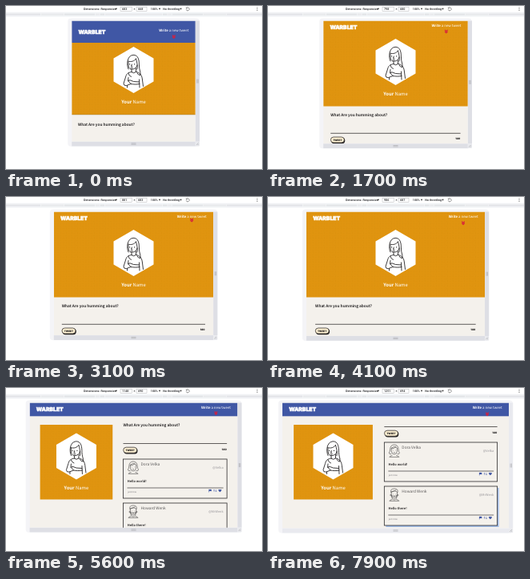
These frames come from a looping animation (320x204 px, 8000 ms). An HTML page:

```html
<!DOCTYPE html>
<html lang="en">
<head>
<meta charset="utf-8">
<title>Responsive page</title>
<style>
  html, body { margin: 0; width: 100%; height: 100%; overflow: hidden; background: #fff; }
  svg { display: block; width: 100vw; height: 100vh; }
  text { white-space: pre; text-rendering: geometricPrecision; }
  .body { font-family: "Noto Sans CJK JP", "Noto Sans CJK SC", "Noto Sans CJK", "Open Sans", sans-serif; }
  .logo { font-family: Inter, "DejaVu Sans", sans-serif; font-weight: 900; }
  .tool { font-family: Roboto, "Liberation Sans", sans-serif; }
</style>
</head>
<body>
<svg id="stage" viewBox="0 0 320 204" preserveAspectRatio="none">
  <defs>
    <pattern id="weave" width="7" height="6" patternUnits="userSpaceOnUse">
      <rect width="7" height="6" fill="#e0940f"/>
      <path d="M0 .6h2.4M3.5 3.4h2.4M1.4 2v2.6M5 5v1M5 0v1.6" stroke="#c98208" stroke-width=".4" opacity=".3"/>
    </pattern>
  </defs>
  <g id="scene"></g>
</svg>
<script>
const LOOP = 8000, STEP = 100;
const SCALE = 0.2263, MID = 159.5, TOP = 18.5;
const BLUE = '#4057a5', CREAM = '#f4f1ec', INK = '#1d1b1c';

// [time, device pixels]
const WIDTHS = [[0, 683], [100, 683], [1000, 736], [1700, 798], [2000, 818], [2100, 818],
  [3000, 879], [3100, 881], [3900, 959], [4800, 1080], [5600, 1148], [6600, 1251]];
const HEIGHTS = [[0, 668], [100, 668], [1000, 675], [1900, 681], [3000, 683],
  [3900, 686], [4800, 690], [5700, 690], [6600, 694]];

const clamp = v => Math.max(0, Math.min(1, v));
const ease = v => v * v * (3 - 2 * v);

function sample(table, t) {
  const i = table.findIndex(p => p[0] > t);
  if (i < 0) return table[table.length - 1][1];
  const [t0, v0] = table[i - 1], [t1, v1] = table[i];
  return v0 + (v1 - v0) * (t - t0) / (t1 - t0);
}

const rect = (x, y, w, h, fill, more = '') =>
  `<rect x="${x}" y="${y}" width="${w}" height="${h}" fill="${fill}" ${more}/>`;
const line = (d, stroke = INK, width = .8, more = '') =>
  `<path d="${d}" fill="none" stroke="${stroke}" stroke-width="${width}" ${more}/>`;
const move = (x, y, inner) => `<g transform="translate(${x} ${y})">${inner}</g>`;
const text = (x, y, s, size, fill, { cls = 'body', weight = 400, anchor = 'start', more = '' } = {}) =>
  `<text class="${cls}" x="${x}" y="${y}" font-size="${size}" fill="${fill}" ` +
  `text-anchor="${anchor}" style="font-weight:${weight}" ${more}>${s}</text>`;
const bold = s => `<tspan style="font-weight:700">${s}</tspan>`;

function toolbar(w, h) {
  const tool = (x, s, anchor = 'start') =>
    text(x, 5.1, s, 3.7, '#202124', { cls: 'tool', anchor, weight: 500 });
  const caret = x => `<path d="M${x} 2.8h2.4l-1.2 1.9z" fill="#222"/>`;
  const field = (x, wide, n) =>
    rect(x, 1.3, wide, 5, '#fff', 'stroke="#a4a7ab" stroke-width=".4"') + tool(x + 2, Math.round(n));
  let out = rect(0, 0, 320, 8, '#fff') + rect(0, 8, 320, 5, '#f1f2f4');
  [1440, 1024, 768, 425, 375, 320].forEach((px, i) => {
    const half = px * SCALE / 2;
    out += rect(MID - half, 9.2, half * 2, 2.6, i % 2 ? '#e6e8eb' : '#e0e2e6',
      'stroke="#f6f7f8" stroke-width=".6"');
  });
  out += line('M0 8H320M0 13H320', '#e4e5e8', .3);
  out += tool(97, 'Dimensions: Responsive') + caret(136.6);
  out += field(143, 14.5, w) + tool(160.5, '×', 'middle') + field(163, 13, h);
  out += tool(180.8, '100%') + caret(190.8) + tool(196.3, 'No throttling') + caret(217.3);
  out += line('M225.5 2.7a2 2 0 1 1-.3 1.6M225.2 1.7l.3 1.3 1.3-.2', '#444', .55);
  for (const y of [2, 3.7, 5.4]) out += `<circle cx="314" cy="${y}" r=".5" fill="#444"/>`;
  return out;
}

function portrait() {
  const hex = '<path d="M0-29 25-14.5V14.5L0 29-25 14.5V-14.5z" fill="#fff"/>';
  const hair = 'M-6.5-1C-9-6-8.5-18-.5-18.7 6.5-19 7-11 7-5 7 0 9 2 8.5 6.5Q6 7 4.5 4M-7-11C-3-9.5 1-11 3-14M3-14C4-10 5.5-6 4.5-1';
  const face = 'M-6.5-10C-7-4-5.5-.8-2.5-.8 1.5-.8 4-3 4.5-6M-2.2-7l-.8 2.4h1.2M-3.4-2.7q1.2.5 2.2 0';
  const torso = 'M-2.5-.6V2.6Q0 5 3 2.4V-2M-2.5 2.6C-7 3-9 5-10 9L-12.5 17Q-12.5 20-9 19.6L-3.5 17.5M3 2.4C8 3.5 10 6 10.8 11L12 20.5M-6.5 9.5L-7 14M-8 19.5V22M7 12L7.5 22M7.5 17.5C3 18.5 0 18-3.5 17.5L-6 14.5Q-6.5 12-4 13L0 14.5 7 15M-6.5 4.5Q-5.5 8-3 8.5';
  return hex + line(hair + face + torso, INK, .85, 'stroke-linecap="round" stroke-linejoin="round"') +
    '<circle cx="-4.8" cy="-7.2" r=".6"/><circle cx="1" cy="-7.2" r=".6"/>';
}

function profile(x, y, w, h, hexY) {
  const cx = x + w / 2;
  return rect(x, y, w, h, 'url(#weave)') + move(cx, hexY, portrait()) +
    text(cx, hexY + 41.7, bold('Your') + ' Name', 5.9, '#fff', { anchor: 'middle', weight: 300 });
}

function header(w, t, tall, fill) {
  const mid = TOP + (tall ? 12.2 : 6.4);
  const navX = w - 8.5;
  const bounce = mid + 5.7 + 1.9 * Math.cos(2 * Math.PI * t / 2000);
  return (fill ? rect(0, TOP, w, tall ? 27.5 : 16.8, fill) : '') +
    text(8.2, mid + 4.3, 'WARBLET', 6.8, '#fff',
      { cls: 'logo', weight: 900, more: 'stroke="#fff" stroke-width=".5"' }) +
    text(navX, mid + 1.4, bold('Write') + ' a new tweet', 4.35, '#fff', { anchor: 'end', weight: 300 }) +
    move(navX - 18.5, bounce, line('M-1.8-1.8 0 0l1.8-1.8M-1.8 .2 0 2l1.8-1.8', '#d81e3c', 1.1));
}

function composer(x, right, y) {
  return text(x, y, 'What Are you humming about?', 4.72, '#2b292a', { weight: 700 }) +
    line(`M${x} ${y + 21.3}H${right}`, '#3a3838', .8) +
    rect(x + .8, y + 26.8, 17.2, 7.4, INK, 'rx="3.6"') +
    rect(x + .2, y + 26, 16.9, 7, '#fdf0d2', `rx="3.5" stroke="${INK}" stroke-width=".7"`) +
    text(x + 8.6, y + 30.6, 'TWEET', 3.1, INK, { cls: 'logo', weight: 900, anchor: 'middle' }) +
    text(right - .4, y + 29.3, '140', 3.2, INK, { cls: 'logo', weight: 900, anchor: 'end' });
}

function face(beard) {
  const head = 'M4.4-2V-6Q8-9 11.6-6V-2Q11 2 8 2 5 2 4.4-2M6.4-3h.5M9.4-3h.5M7-.2h2';
  const style = beard
    ? 'M4-5Q2.5-10 8-10 13.5-10 12-5M4-6Q8-6 10.5-8.5M4.2-3Q2.6-3 3-1.4L4.4-1M11.8-3Q13.4-3 13-1.4L11.6-1M4.4-2Q5 4 8 4 11 4 11.6-2L10-.8H6z'
    : 'M4.4 1.5Q1.6 2.5 1.4 0 2.6-1 2.8-4 3-10 8-10 13-10 13.2-4 13.4-1 14.6 0 14.4 2.5 11.6 1.5M4.4-5Q8-5 10.5-8';
  return line(head + style + 'M5.6 3.4Q2.4 4 2 5.4H14Q13.6 4 10.4 3.4', '#4a4849', .6, 'stroke-linejoin="round"');
}

function actions(x, y) {
  return move(x, y,
    `<path d="M-1.7-1.8h.5v.3q1.2-.6 2.9 0V.8q-1.7-.6-2.9 0V2h-.5z" fill="${BLUE}"/>` +
    line('M5 1.4V-1M4.2-.3l.8-.9.8.9M7.4-1.3V1.1M6.6.4l.8.9.8-.9', BLUE, .5) +
    `<path d="M12.3 1.8C10.3.2 10.2-.5 10.5-1.2q1-1.1 1.8.1.8-1.2 1.8-.1c.3.7.2 1.4-1.8 3z" fill="${BLUE}"/>`);
}

function card(x, y, w, person, lift) {
  const shadow = lift ? rect(x + 2 * lift, y + 2 * lift, w, 49, '#a5bfe8') : '';
  return shadow + rect(x, y, w, 49, CREAM, 'stroke="#2c2a2b" stroke-width=".8"') +
    move(x + 4.5, y + 13, face(person.beard)) +
    text(x + 22, y + 7.5, person.name, 4.8, '#5a5859', { weight: 300 }) +
    text(x + w - 4.5, y + 12.4, person.handle, 3.9, '#98969a', { anchor: 'end', weight: 300 }) +
    text(x + 5.2, y + 29, person.words, 3.96, '#333132', { weight: 700 }) +
    line(`M${x + 5} ${y + 36}H${x + w - 4.5}`, '#3a3838', .7) +
    text(x + 5.5, y + 42, 'just now', 2.8, '#77757a') +
    actions(x + w - 21, y + 39.5);
}

const PEOPLE = [
  { name: 'Dora Velka', handle: '@Velka', words: 'Hello world!' },
  { name: 'Howard Wenk', handle: '@MrWenk', words: 'Hello there!', beard: true }
];

function page(w, h, px, t) {
  const pad = w * .05, right = w * .949;
  const bg = rect(0, TOP, w, h, CREAM);
  if (px < 768) {
    return bg + profile(0, 46, w, 90, 80) + line(`M0 136H${w}`, '#8f7a50', .4) +
      header(w, t, true, BLUE) + composer(pad, right, 149.5);
  }
  if (px < 1024) {
    return bg + profile(0, TOP, w, 107, 70) + header(w, t, false) + composer(pad, right, 138);
  }
  const x = w * .45, scroll = 21 * ease(clamp((t - 7100) / 600));
  const lift = clamp((t - 7500) / 300);
  return bg + composer(x, right, 48.2 - scroll) +
    PEOPLE.map((p, i) => card(x, 89 + i * 55 - scroll, right - x, p, i ? lift : 0)).join('') +
    profile(pad, 46, w * .349, 93.5, 85.5) + header(w, t, false, BLUE);
}

function frame(x, w, h, t) {
  const r = x + w, b = TOP + h, my = TOP + h / 2;
  const tone = t < 6900 ? '#dedfe5' : '#e9eaef';
  return rect(x - 5, 15.5, w + 10, h + 9, '#f4f4f7', 'rx="4"') +
    rect(r, TOP, 5.2, h, tone) + rect(x, b, w, 5.8, tone) +
    rect(r, b, 5.2, 5.8, '#e9eaee', 'rx="1"') +
    line(`M${r + 2} ${my - 2.5}v5M${r + 3.4} ${my - 2.5}v5`, '#98999d', .5) +
    line(`M${MID - 3} ${b + 2.2}h6M${MID - 3} ${b + 3.6}h6`, '#98999d', .5) +
    line(`M${r + 1.2} ${b + 4.2}l2.6-2.6M${r + 2.8} ${b + 4.4}l1.2-1.2`, '#98999d', .5);
}

function scene(t) {
  const px = sample(WIDTHS, t), py = sample(HEIGHTS, t);
  const w = px * SCALE, h = py * SCALE, x = MID - w / 2;
  return toolbar(px, py) + frame(x, w, h, t) +
    `<clipPath id="view">${rect(0, TOP, w, h, '#000')}</clipPath>` +
    move(x, 0, `<g clip-path="url(#view)">${page(w, h, px, t)}</g>`);
}

const root = document.getElementById('scene');
const start = performance.now();
let shown = -1;
function tick(now) {
  const t = Math.floor(Math.max(0, now - start) % LOOP / STEP) * STEP;
  if (t !== shown) root.innerHTML = scene(shown = t);
  requestAnimationFrame(tick);
}
tick(start);
</script>
</body>
</html>
```
